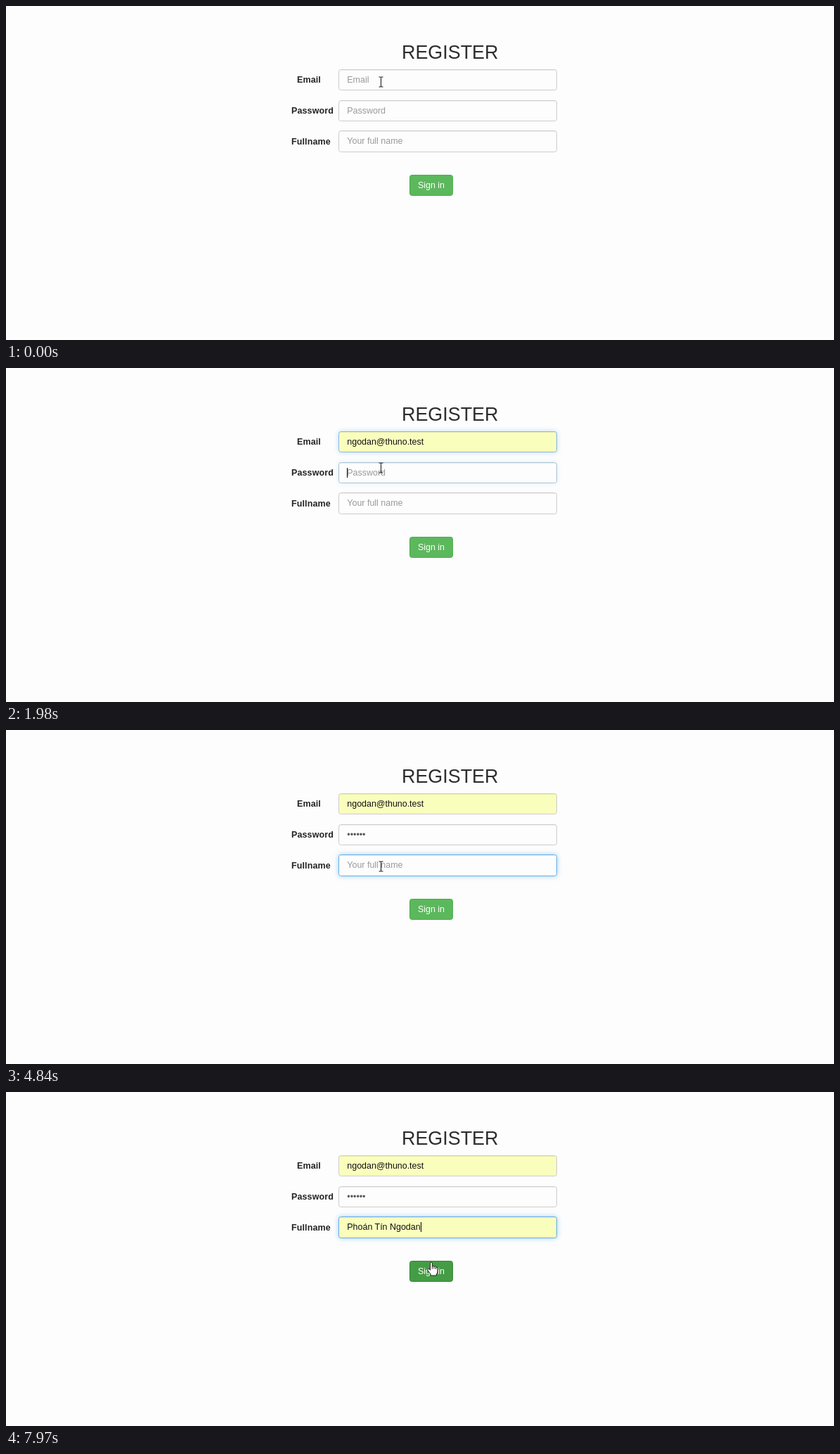
These frames come from a looping animation (1178 by 475 pixels, 8000 ms). An HTML page:

```html
<!DOCTYPE html>
<html lang="en">
<head>
<meta charset="utf-8">
<title>Register form</title>
<style>
html, body { margin: 0; width: 100%; height: 100%; overflow: hidden; background: #fdfdfd; }
body { position: relative; font: 12.46px "Liberation Sans", Arial, sans-serif; color: #333; }
body > * { position: absolute; box-sizing: border-box; white-space: pre; }
h1 { left: 563px; top: 51px; margin: 0; font-size: 26.9px; font-weight: 400; line-height: 30px; color: #2d2d2d; }
label { font-weight: 700; letter-spacing: .15px; line-height: 30px; color: #222; }
.field { left: 473px; width: 311px; height: 30px; padding-left: 11.3px; line-height: 28px;
  border: 1px solid; border-radius: 3.5px; color: #555; }
.field.filled { background: #fafebd; color: #111; }
.hint { color: #999; }
.pick { background: #39f; color: #fff; }
.caret { display: inline-block; width: 1px; height: 14px; margin-right: -1px; vertical-align: -3px; background: #000; }
.menu { left: 473px; width: 311px; border: 1px solid #c0c0c0; background: #fdfdfd; color: #111;
  font: 12.6px/21.4px "Noto Sans", sans-serif; }
.menu div { height: 21.4px; padding-left: 2px; }
.menu .on { background: #c9c9c9; }
#button { left: 574px; top: 240px; width: 62px; height: 30px; border: 1px solid #4cae4c; border-radius: 3.5px;
  background: #5cb85c; color: #fff; line-height: 28px; text-align: center; }
#button.hover { background: #449d44; border-color: #398439; }
svg { left: 0; top: 0; width: 30px; height: 30px; overflow: visible; }
</style>
</head>
<body>
<h1>REGISTER</h1>
<label style="left:414px;top:90px">Email</label>
<label style="left:406px;top:134px">Password</label>
<label style="left:406px;top:177.5px">Fullname</label>
<div class="field" style="top:90px"></div>
<div class="field" style="top:134px"></div>
<div class="field" style="top:177px;height:31px;line-height:29px"></div>
<div id="button">Sign in</div>
<div class="menu" style="top:120px;height:130px"></div>
<div class="menu" style="top:208px;height:44px"></div>
<svg id="cursor">
  <path id="beam" d="M-3 -7H-.8L0 -6.2L.8 -7H3M0 -6.2V6.2M-3 7H-.8L0 6.2L.8 7H3" fill="none" stroke="#222" stroke-width="1.1"/>
  <path id="arrow" d="M.5 .5V14L3.6 11L5.7 16L8 15L5.9 10.2H10Z" fill="#fff" stroke="#333"/>
  <path id="hand" d="M-1.4 1Q0 -1 1.4 1V6Q3 4.8 4 6.4Q5.6 5.4 6.6 7Q8.6 6.2 9 8.4V13Q9 15.5 7.4 17V19H-1V17L-5 11.5Q-5.6 9 -3.4 9.4L-1.4 11.4Z
    M1.4 6V9.5M4 6.4V9.7M6.6 7V10" fill="#fff" stroke="#222"/>
</svg>
<script>
const LOOP = 8000, BLINK = 490, KEY_GAP = 250, KEYS = 6;
const EMAIL = "ngodan@thuno.test", NAME = "Phoán Tín Ngodan";
const emails = [EMAIL, EMAIL + "123123", "ngodan2@thuno.test", "ngodan2@thuno.test123", "noan@thuno.test", "ngodan1@thuno.test"];
const names = [NAME, "phoan tin ngodan"];

const at = {
  emailFocus: 120, emailKey: 1060, emailMenu: 1130, emailHover: 1340, emailPick: 1670,
  passFocus: 1930, passKey: 2200,
  nameFocus: 4160, nameClick: 4350, nameKey: 5790, nameMenu: 5850, nameHover: 6610, namePick: 6990
};

const moves = [
  { from: 1130, to: 1420, x: 532, y: 131 },
  { from: 1670, to: 1790, x: 533, y: 142 },
  { from: 3600, to: 3980, x: 533, y: 194, bow: 7 },
  { from: 7400, to: 7570, x: 544, y: 166 },
  { from: 7750, to: 7970, x: 605, y: 242 }
];

const $ = id => document.getElementById(id);
const fields = document.querySelectorAll(".field");
const menus = document.querySelectorAll(".menu");
const within = (t, a, b) => t >= a && t < b;
const clamp = v => Math.max(0, Math.min(1, v));
const lerp = (a, b, k) => a + (b - a) * k;
const smooth = k => k * k * (3 - 2 * k);
const mix = (a, b, k) => `rgb(${a.map((v, i) => Math.round(lerp(v, b[i], k)))})`;

// Focus fades in three hard steps
const focusFade = (t, start) => clamp(Math.floor((t - start) / 60 + 1) / 3);

const typedKeys = t => Math.max(0, Math.min(KEYS, Math.floor((t - at.passKey) / KEY_GAP) + 1));

// Every action shows the caret again and restarts its blinking
function caretOn(t) {
  const keys = typedKeys(t);
  const lastKey = keys ? at.passKey + (keys - 1) * KEY_GAP : 0;
  const last = Math.max(lastKey, ...Object.values(at).filter(a => a <= t));
  return t >= at.emailFocus && Math.floor((t - last) / BLINK) % 2 === 0;
}

function cursorAt(t) {
  let x = 533, y = 108;
  for (const m of moves) {
    const k = smooth(clamp((t - m.from) / (m.to - m.from)));
    x = lerp(x, m.x, k) + (m.bow || 0) * Math.sin(Math.PI * k);
    y = lerp(y, m.y, k);
  }
  return [Math.round(x), Math.round(y)];
}

function setHtml(el, html) {
  if (el.shown !== html) el.innerHTML = el.shown = html;
}

function drawField(i, { text = "", hint, pick = "", filled = false, glow, caret }) {
  const el = fields[i];
  el.classList.toggle("filled", filled);
  el.style.borderColor = mix([204, 204, 204], [102, 175, 233], glow);
  el.style.boxShadow = `inset 0 1px 1px rgba(0,0,0,.06), 0 0 7px rgba(102,175,233,${.6 * glow})`;
  setHtml(el, text
    + (pick && `<span class="pick">${pick}</span>`)
    + (caret ? '<span class="caret"></span>' : "")
    + (text ? "" : `<span class="hint">${hint}</span>`));
}

function drawMenu(i, rows, open, hover) {
  menus[i].style.display = open ? "" : "none";
  setHtml(menus[i], rows.map((r, n) => `<div class="${hover && !n ? "on" : ""}">${r}</div>`).join(""));
}

function drawCursor(t, menuOpen) {
  const [x, y] = cursorAt(t);
  const onButton = within(x, 574, 636) && within(y, 240, 270);
  const onField = within(y, 90, 120) || within(y, 134, 164) && !menuOpen || within(y, 177, 208);
  const shape = onButton ? "hand" : onField ? "beam" : "arrow";
  for (const id of ["beam", "arrow", "hand"]) $(id).style.display = id === shape ? "" : "none";
  $("cursor").style.transform = `translate(${x + (shape === "beam" ? .5 : 0)}px, ${y}px)`;
  $("button").classList.toggle("hover", onButton);
}

function draw(t) {
  const onEmail = focusFade(t, at.emailFocus);
  const onPass = focusFade(t, at.passFocus);
  const onName = focusFade(t, at.nameFocus);
  const emailHover = within(t, at.emailHover, at.emailPick);
  const nameHover = within(t, at.nameHover, at.namePick);
  const emailOpen = within(t, at.emailMenu, at.emailPick);
  const caret = caretOn(t) && !emailHover && !nameHover;

  drawField(0, {
    hint: "Email", text: t >= at.emailPick ? EMAIL : t >= at.emailKey ? EMAIL[0] : "",
    pick: emailHover ? EMAIL.slice(1) : "", filled: t >= at.emailHover,
    glow: onEmail - onPass, caret: caret && t < at.passFocus
  });
  drawField(1, {
    hint: "Password", text: "•".repeat(typedKeys(t)),
    glow: onPass - onName, caret: caret && within(t, at.passFocus, at.nameFocus)
  });
  drawField(2, {
    hint: "Your full name", text: t >= at.namePick ? NAME : t >= at.nameKey ? NAME[0] : "",
    pick: nameHover ? NAME.slice(1) : "", filled: t >= at.nameHover,
    glow: onName, caret: caret && t >= at.nameFocus
  });
  drawMenu(0, emails, emailOpen, emailHover);
  drawMenu(1, names, within(t, at.nameMenu, at.namePick), nameHover);
  drawCursor(t, emailOpen);
}

const start = performance.now();
function tick() {
  draw((performance.now() - start) % LOOP);
  requestAnimationFrame(tick);
}
tick();
</script>
</body>
</html>
```
